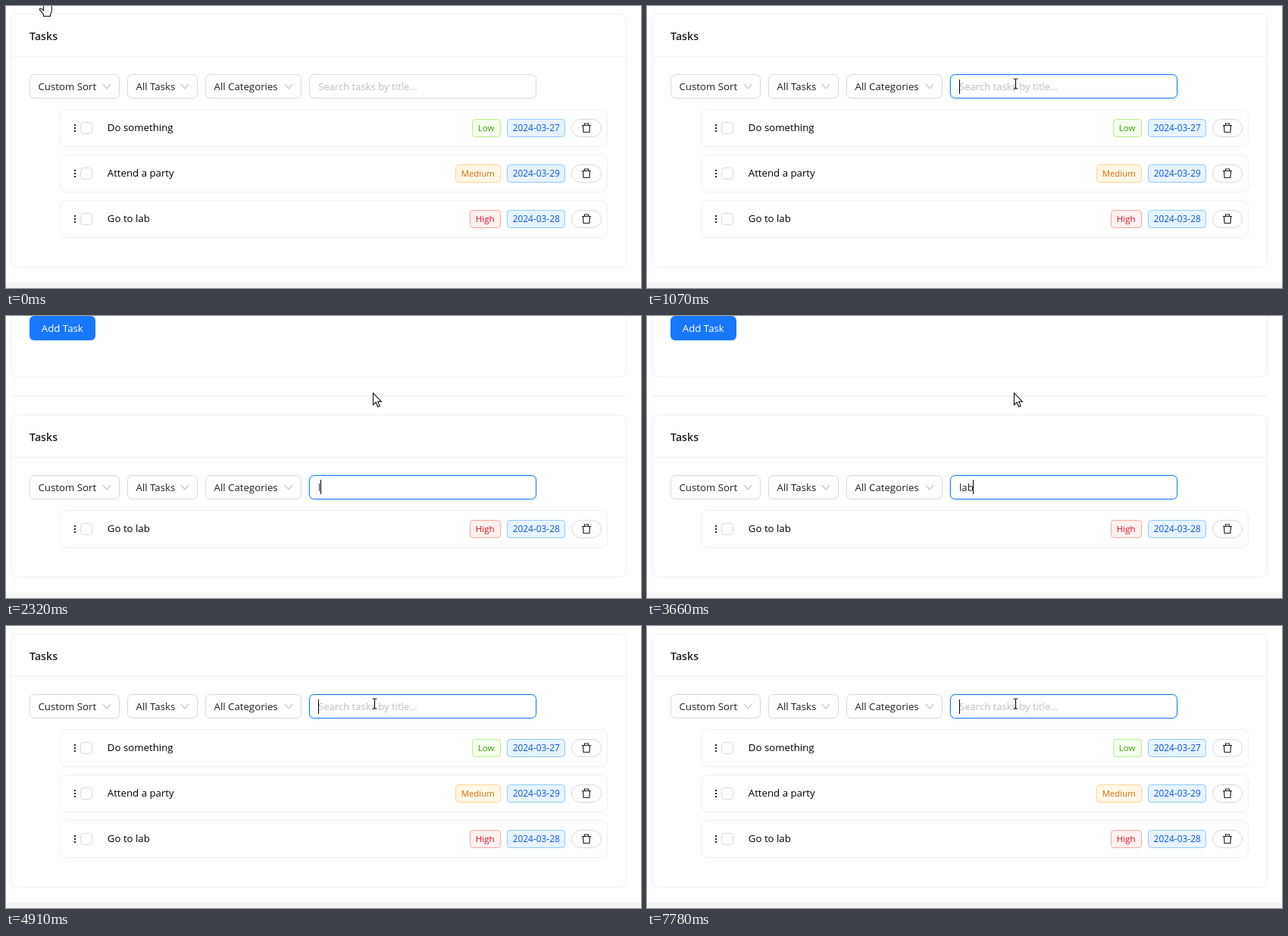
An HTML page that plays this animation: 838x372 px, repeating every 8 s.

```html
<!DOCTYPE html>
<html lang="en">
<head>
<meta charset="utf-8">
<title>Tasks</title>
<style>
html, body { margin: 0; width: 100%; height: 100%; overflow: hidden; background: #fff; }
svg { display: block; width: 838px; height: 372px; }
text { font: 13.25px "Open Sans", "Noto Sans", sans-serif; fill: #1f1f1f; white-space: pre; }
.head { font-size: 14.2px; font-weight: 600; }
.hint { font-size: 13.1px; fill: #bfbfbf; }
.tag { font-size: 11.6px; }
.line { fill: none; stroke: #f0f0f0; }
.box { fill: #fff; stroke: #d9d9d9; }
</style>
</head>
<body>
<svg id="stage" viewBox="0 0 838 372"></svg>
<script>
const LOOP = 8000;

const rect = (x, y, w, h, r, attrs) =>
  `<rect x="${x + .5}" y="${y + .5}" width="${w - 1}" height="${h - 1}" rx="${r}" ${attrs}/>`;
const text = (x, y, s, attrs = '') => `<text x="${x}" y="${y}" ${attrs}>${s}</text>`;

const select = (x, w, label) =>
  rect(x, 90, w, 32, 6, 'class="box"') + text(x + 11.5, 111, label) +
  `<path d="M${x + w - 22} 103l5 6 5-6" fill="none" stroke="#b8b8b8" stroke-width="1.1"/>`;

const tag = (x, w, label, fill, stroke, color, size = 11.6) =>
  rect(x, 13, w, 24, 4, `fill="${fill}" stroke="${stroke}"`) +
  text(x + 7.7, 29.2, label, `class="tag" style="fill:${color};font-size:${size}px"`);

const row = (y, title, date, level) => `<g class="row" transform="translate(0 ${y})">` +
  rect(71, 0, 723, 50, 8, 'class="line"') +
  [20, 24, 28].map(d => `<rect x="90" y="${d}" width="2" height="2" rx=".6" fill="#111"/>`).join('') +
  rect(98, 17, 16, 16, 4, 'class="box"') +
  text(133.8, 29.2, title, 'style="fill:#000"') +
  tag(...level) + tag(661, 77, date, '#e6f4ff', '#91caff', '#0958d9', 11.9) +
  rect(746, 13, 40, 24, 11.5, 'class="box"') +
  `<path d="M760 21.5h12M763.5 21v-2h5v2M761.5 22l.6 8.5h7.8l.6-8.5" fill="none" stroke="#222" stroke-width="1.2"/></g>`;

const stage = document.getElementById('stage');
stage.innerHTML = `
<rect y="365" width="838" height="7" fill="#f5f5f5"/>
<g id="form">
  <path class="line" d="M6.5 -2V72.5a8 8 0 0 0 8 8H810.5a8 8 0 0 0 8-8V-2M6 105.5H819"/>
  <rect x="31" y="2" width="87" height="32" rx="6" fill="#e6f4ff"/>
  <rect x="31" y="0" width="87" height="32" rx="6" fill="#1677ff"/>
  ${text(46.8, 21, 'Add Task', 'style="fill:#fff"')}
</g>
${rect(6, 10, 813, 335, 8, 'class="line" id="card"')}
<g id="panel">
  <path class="line" d="M7 66.5H818"/>
  ${text(31, 45, 'Tasks', 'class="head"')}
  ${select(31, 119, 'Custom Sort') + select(160, 93, 'All Tasks') + select(263, 127, 'All Categories')}
  <rect id="glow" x="398" y="88" width="304" height="36" rx="8" fill="#e6f4ff"/>
  ${rect(400, 90, 300, 32, 6, 'class="box" id="field"')}
  ${text(412, 111, 'Search tasks by title...', 'class="hint" id="hint"')}
  ${text(412, 111, '', 'id="typed"')}
</g>
${row(136, 'Do something', '2024-03-27', [615, 38, 'Low', '#f6ffed', '#b7eb8f', '#389e0d'])}
${row(196, 'Attend a party', '2024-03-29', [593, 60, 'Medium', '#fff7e6', '#ffd591', '#d46b08', 11.4])}
${row(256, 'Go to lab', '2024-03-28', [612, 41, 'High', '#fff1f0', '#ffa39e', '#cf1322'])}
<rect id="caret" width="1" height="19" fill="#000"/>
<g id="hand"><path d="M49.5 -3V6L46.8 3.6Q44.8 2.6 44.3 4.6L49.5 11.2V13.5H58.5V11L60.3 7V.5Q59.6 -1.5 57.8 -.4Q56.6 -2 55 -1Q53.8 -2.4 52.4 -1.6V-6Q51 -7.5 49.5 -6Z" fill="#fff" stroke="#111" stroke-width="1.1"/></g>
<path id="arrow" d="M.5 .5V16.2L4.2 12.8L6.7 18.8L9.2 17.7L6.7 11.9H11.4Z" fill="#fff" stroke="#111" stroke-width="1.1"/>
<path id="beam" d="M-3 -6.5H-1L0 -5.8L1 -6.5H3M0 -6V6M-3 6.5H-1L0 5.8L1 6.5H3" fill="none" stroke="#111" stroke-width="1.2"/>`;

const el = Object.fromEntries([...stage.querySelectorAll('[id]')].map(n => [n.id, n]));
const rows = [...stage.querySelectorAll('.row')];
const show = (node, on) => node.setAttribute('visibility', on ? 'visible' : 'hidden');
const place = (node, x, y) => node.setAttribute('transform', `translate(${x} ${y})`);

// [start, typed text, caret shown]
const keys = [
  [0, '', 0], [890, '', 1], [1430, '', 0], [1970, '', 1],
  [2320, 'l', 1], [2500, 'la', 1], [2680, 'lab', 1], [3220, 'lab', 0],
  [3660, 'lab', 1], [4200, 'lab', 0], [4560, 'la', 0], [4740, 'l', 1],
  [4910, '', 1], [5270, '', 0], [5720, '', 1], [6260, '', 0],
  [6790, '', 1], [7240, '', 0], [7780, '', 1]
];
const caretX = [412, 415, 422, 430];
const mix = (a, b, k) => `rgb(${a.map((v, i) => Math.round(v + (b[i] - v) * k))})`;
const GREY = [217, 217, 217], HOVER = [64, 150, 255], FOCUS = [22, 119, 255];

function render(t) {
  const [, typed, caret] = keys.findLast(k => k[0] <= t);
  const filtered = typed !== '';
  show(el.form, filtered);
  el.card.setAttribute('y', filtered ? 130.5 : 10.5);
  el.card.setAttribute('height', filtered ? 214 : 334);
  place(el.panel, 0, filtered ? 120 : 0);
  show(rows[0], !filtered);
  show(rows[1], !filtered);

  el.typed.textContent = typed;
  show(el.hint, !filtered);
  show(el.caret, caret);
  el.caret.setAttribute('x', caretX[typed.length]);
  el.caret.setAttribute('y', filtered ? 216 : 97);

  // pointer glides into the field in six steps, then the field gains focus in three
  const step = t < 270 ? 0 : Math.min(6, 1 + Math.floor((t - 270) / 88));
  const focus = t < 890 ? 0 : Math.min(3, 1 + Math.floor((t - 890) / 90)) / 3;
  const p = 1 - (1 - step / 6) ** 2;
  const x = 52 + 434.5 * p, y = 103.5 * p;
  const inside = step > 3;
  el.field.style.stroke = focus ? mix(HOVER, FOCUS, focus) : mix(GREY, HOVER, Math.max(0, step - 3) / 3);
  el.glow.setAttribute('opacity', focus);

  show(el.hand, step === 0);
  show(el.beam, inside && !filtered);
  place(el.beam, x, focus ? 102.5 : y);
  show(el.arrow, filtered || (step > 0 && !inside));
  place(el.arrow, filtered ? 484 : x, filtered ? 101 : y);
}

const start = performance.now();
function tick() {
  render((performance.now() - start) % LOOP);
  requestAnimationFrame(tick);
}
tick();
</script>
</body>
</html>
```
